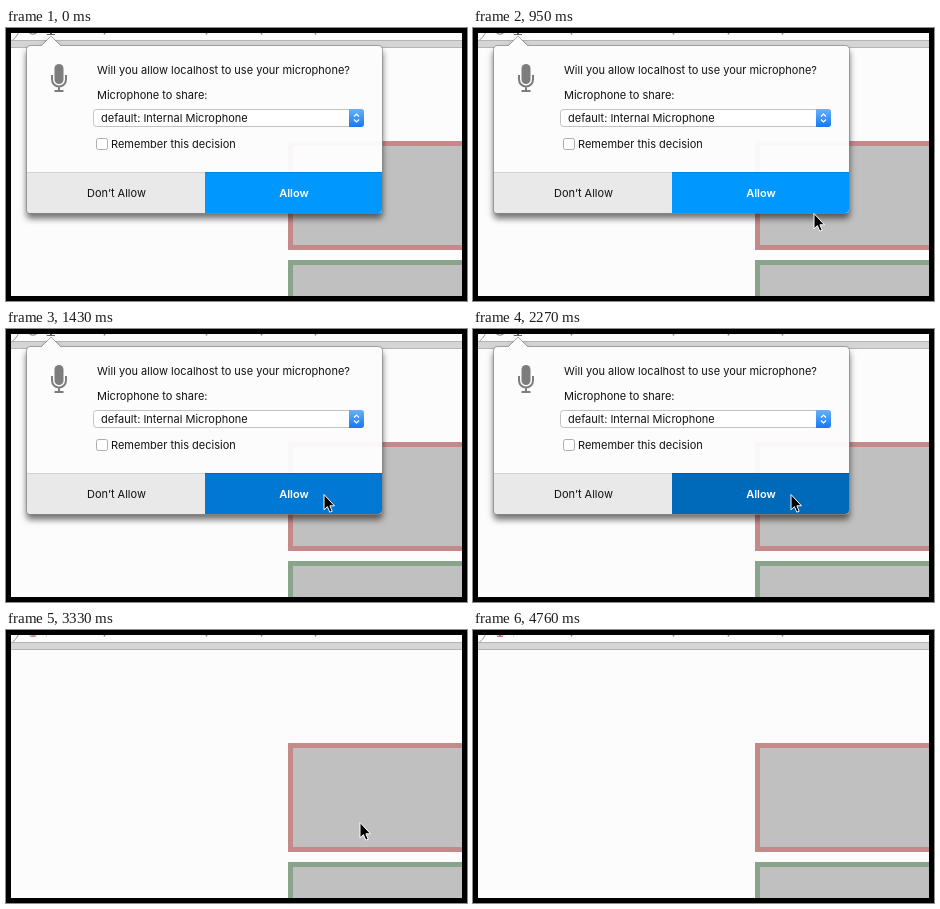
Recreate the animation shown at these times as an HTML page. Size 461 px wide and 273 px high, loop 4.86 s.

```html
<!DOCTYPE html>
<html lang="en">
<head>
<meta charset="utf-8">
<title>Microphone permission</title>
<style>
  html, body { margin: 0; width: 100%; height: 100%; overflow: hidden; background: #000; }
  svg { display: block; width: 461px; height: 273px; }
  text { font: 11px Inter, "Open Sans", sans-serif; fill: #111; }
  .mid { text-anchor: middle; }
  .bold { font-weight: 600; fill: #fff; }
  #panel { filter: drop-shadow(0 5px 3px rgba(0, 0, 0, .55)); }
</style>
</head>
<body>
<svg viewBox="0 0 461 273">
  <defs>
    <linearGradient id="blue" x2="0" y2="1">
      <stop stop-color="#67b1fa"/>
      <stop offset="1" stop-color="#1678f5"/>
    </linearGradient>
  </defs>

  <!-- page -->
  <rect width="461" height="273" fill="#fcfcfc"/>
  <path d="M5 13.5Q10 10 13 4" fill="none" stroke="#999"/>
  <path d="M40.5 5v2" stroke="#ddd"/>
  <path d="M98.5 5v1.5M200.5 5v1.5M255.5 5v1.5M309.5 5v1.5" stroke="#888" stroke-width="1.5"/>
  <rect x="5" y="12" width="451" height="8" fill="#d5d5d5"/>
  <path d="M5 12.5H456M5 19.5H456" stroke="#b4b4b4"/>
  <g fill="#c0c0c0" stroke-width="5">
    <rect x="284.5" y="115.5" width="200" height="104" stroke="#c48a8a"/>
    <rect x="284.5" y="234.5" width="200" height="104" stroke="#8aa48c"/>
  </g>
  <circle id="info" cx="27" cy=".5" r="5.7" fill="none" stroke="#777"/>
  <path id="live" d="M26 4h2v2h2v1h-6v-1h2z" fill="#e01b1b" opacity="0"/>

  <!-- permission prompt -->
  <g id="prompt">
    <path d="M44 4h2v2h3v1h-8v-1h3z" fill="#666"/>
    <path id="panel" d="M25 17.5H35.5L45 8L54.5 17.5H372q4.5 0 4.5 4.500V181q0 4.500-4.500 4.500H25q-4.500 0-4.500-4.500V22q0-4.500 4.500-4.500z"
          fill="#fcfcfc" stroke="#000" stroke-opacity=".3"/>
    <path d="M282 113H376V118H287V144H282z" fill="#f9f7f7"/>
    <path d="M21 144H199V185H25q-4 0-4-4z" fill="#e9e9e9"/>
    <path d="M21 144.5H199" stroke="#d2d2d2"/>
    <path id="allow" d="M199 144H376V181q0 4-4 4H199z" fill="#0098ff"/>
    <path d="M199 144.5H376" stroke="#000" stroke-opacity=".14"/>

    <rect x="48.5" y="36" width="9" height="20" rx="4.5" fill="#7d7d7d"/>
    <path d="M46 47v4.500a7 7 0 0 0 14 0V47M53 59v4M48.500 63h9"
          fill="none" stroke="#7d7d7d" stroke-width="2"/>

    <text x="91" y="46">Will you allow localhost to use your microphone?</text>
    <text x="91" y="71">Microphone to share:</text>

    <rect x="87.5" y="81.5" width="270" height="17" rx="3" fill="#fff" stroke="#c2c2c2"/>
    <path d="M343 81H355q3 0 3 3V96q0 3-3 3H343z" fill="url(#blue)"/>
    <path d="M348 88.500l2.500-2.500 2.500 2.500M348 91.500l2.500 2.500 2.500-2.500"
          fill="none" stroke="#fff" stroke-width="1.2"/>
    <text x="95" y="94">default: Internal Microphone</text>

    <rect x="90.5" y="110.5" width="11" height="11" rx="2" fill="#fff" stroke="#adadad"/>
    <text x="105" y="120">Remember this decision</text>
    <text class="mid" x="110.5" y="169">Don’t Allow</text>
    <text class="mid bold" x="288" y="169">Allow</text>
  </g>

  <g id="cursor" visibility="hidden">
    <path d="M1 .5V15.800L4.400 12.600L6.800 18.200L9.200 17.200L6.900 11.800H11.500z"
          fill="#000" stroke="#fff" stroke-linejoin="round"/>
  </g>

  <rect x="2.5" y="2.5" width="456" height="268" fill="none" stroke="#000" stroke-width="5"/>
</svg>
<script>
  const LOOP = 4860;
  const byId = id => document.getElementById(id);

  // Each step is [ms, value]; a value holds until the next step.
  function hold(id, prop, steps) {
    const frames = steps.map(([ms, value]) => ({
      offset: Math.max(0, ms - 0.5) / LOOP, [prop]: value, easing: "step-end"
    }));
    frames.push({ offset: 1, [prop]: steps[steps.length - 1][1] });
    byId(id).animate(frames, { duration: LOOP, iterations: Infinity });
  }

  // Samples value(u) in n equal steps, u running up to 1.
  const ramp = (from, to, n, value) => Array.from({ length: n }, (_, i) => {
    const u = (i + 1) / n;
    return [from + (to - from) * u, value(u)];
  });

  const linear = u => u;
  const easeIn = u => u * u;
  const easeOut = u => 1 - (1 - u) ** 2;
  const at = ([x, y]) => `translate(${x}px, ${y}px)`;
  const glide = (a, b, ease) => u =>
    at(a.map((v, i) => Math.round(v + (b[i] - v) * ease(u))));

  const enter = [369, 220], below = [340, 185], press = [317, 165], leave = [417, 241];
  hold("cursor", "transform", [
    [0, at(enter)],
    ...ramp(720, 950, 2, glide(enter, below, linear)),
    ...ramp(950, 1430, 4, glide(below, press, easeOut)),
    ...ramp(2970, 3570, 5, glide(press, leave, easeIn))
  ]);
  hold("cursor", "visibility", [[0, "hidden"], [720, "visible"], [3690, "hidden"]]);

  hold("allow", "fill", [[0, "#0098ff"], [1070, "#0078d4"], [2270, "#006aba"]]);
  hold("prompt", "visibility", [[0, "visible"], [2500, "hidden"]]);

  // The recording mark pulses, trading places with the info mark.
  const pulse = [
    [0, 0], [2500, 1],
    ...ramp(2970, 3570, 5, u => 1 - u),
    ...ramp(4400, 4760, 3, u => 0.6 * u)
  ];
  hold("live", "opacity", pulse);
  hold("info", "opacity", pulse.map(([ms, v]) => [ms, 1 - v]));
</script>
</body>
</html>
```
